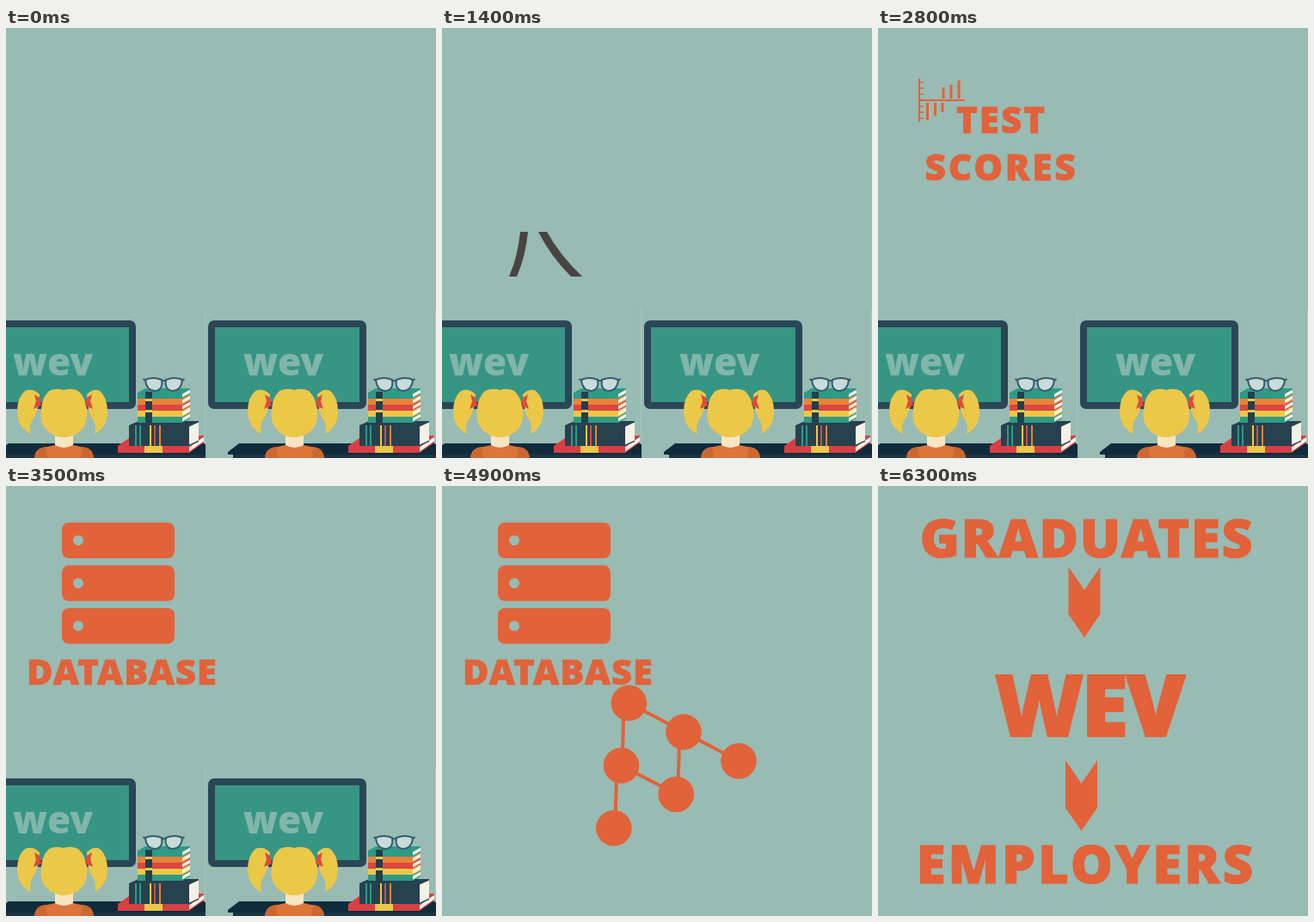
These frames come from a looping animation (500 px wide and 500 px high, 7 s). An HTML page:

```html
<!DOCTYPE html>
<html lang="en">
<head>
<meta charset="utf-8">
<title>Classroom to employers</title>
<style>
html, body { margin: 0; width: 100%; height: 100%; overflow: hidden; background: #98bbb3; }
svg { display: block; width: 100vw; height: 100vh; }
text { font-family: "Open Sans", sans-serif; font-weight: 800; text-anchor: middle; }
.ink { fill: #e2623a; }
.word { fill: #e2623a; stroke: #e2623a; stroke-width: .018em; }
.line { fill: none; stroke: #e2623a; }
.trail { fill: #4a4343; }

/* --at: first beat; the class gives how many 700 ms beats it stays */
.scene { visibility: hidden; animation: 7s step-end infinite; animation-delay: calc(var(--at) * 700ms - 7000ms); }
.b1 { animation-name: show1; }
.b2 { animation-name: show2; }
.b4 { animation-name: show4; }
.b6 { animation-name: show6; }
@keyframes show1 { 0% { visibility: visible } 10%, 100% { visibility: hidden } }
@keyframes show2 { 0% { visibility: visible } 20%, 100% { visibility: hidden } }
@keyframes show4 { 0% { visibility: visible } 40%, 100% { visibility: hidden } }
@keyframes show6 { 0% { visibility: visible } 60%, 100% { visibility: hidden } }
</style>
</head>
<body>
<svg viewBox="0 0 500 500">
  <defs>
    <clipPath id="tile"><rect x="-36" y="320" width="268" height="180"/></clipPath>

    <g id="desk" clip-path="url(#tile)">
      <rect x="-33" y="340" width="184" height="103" rx="7" fill="#2b4656"/>
      <rect x="-25" y="348" width="168" height="87" fill="#379584"/>
      <text x="54.500" y="404" font-size="44" fill="#82b6aa">wev</text>
      <path d="M3 483H232V496H-10V493Z" fill="#0f2b3c"/>
      <path d="M-4 496H232V500H-4Z" fill="#1c3444"/>

      <g id="girl">
        <path d="M33 500Q34 488 48 487L57 485H78L87 487Q100 488 102 500Z" fill="#dd7438"/>
        <path d="M33 500Q34 488 46 487L48 500ZM102 500Q101 488 89 487L87 500Z" fill="#cd6730"/>
        <path d="M43 462H92L78 474V485Q67 491 57 485V474Z" fill="#f8e6c2"/>
        <g fill="#ecc849">
          <path d="M39 426Q31 418 22 422Q13 429 13 447Q14 465 29 472Q26 461 33 452Q38 444 39 426Z"/>
          <path d="M94 426Q102 418 109 422Q118 429 118 447Q117 465 103 472Q106 461 99 452Q95 444 94 426Z"/>
          <path d="M67 421Q76 418 84 422Q92 429 94 443Q96 460 85 470Q67 482 50 470Q38 460 41 443Q42 429 50 422Q59 418 67 421Z"/>
        </g>
        <g fill="#df4a3c">
          <path d="M33 426L39 430L41 439L32 443L35 434Z"/>
          <path d="M100 426L94 430L92 439L101 443L98 434Z"/>
        </g>
      </g>

      <g id="books"></g>
      <path d="M162 423H170V459H162Z" fill="#243f4c"/>
      <path d="M162 431H170V434H162ZM162 444H170V447H162Z" fill="#ecc849"/>
      <path d="M151 462V486M156 462V486" stroke="#2f9a86" stroke-width="2"/>
      <path d="M168 462V486" stroke="#ecc849" stroke-width="2"/>
      <path d="M173 462V486" stroke="#dd4740" stroke-width="2"/>
      <path d="M179 462V486" stroke="#e98237" stroke-width="2"/>
      <path d="M161 486H182V494H161Z" fill="#ecc849"/>

      <g fill="#c8dcda" stroke="#355c70" stroke-width="2">
        <path d="M162 409Q171 405 181 409Q183 421 173 422Q163 421 162 409Z"/>
        <path d="M186 409Q196 405 205 409Q204 421 194 422Q184 421 186 409Z"/>
        <path d="M181 411Q183.500 409 186 411M162 410L159.500 408M205 410L207.500 408" fill="none"/>
      </g>
      <path d="M231.500 327V484" stroke="#a9c7c0"/>
    </g>

    <circle id="node" r="20.800" class="ink"/>
    <path id="arrow" class="ink" d="M0 0L18.500 27L37 0V55L18.500 82L0 55Z"/>
    <g id="server">
      <rect width="131" height="41.500" rx="8" class="ink"/>
      <circle cx="19" cy="20.700" r="6" fill="#98bbb3"/>
    </g>
  </defs>

  <rect width="500" height="500" fill="#98bbb3"/>

  <g class="scene b6" style="--at:0">
    <use href="#desk"/>
    <use href="#desk" x="268"/>
  </g>

  <g class="trail">
    <path class="scene b1" style="--at:1" d="M78 289H87Q78 311 65 333H56Q69 311 78 289ZM150 289H163Q186 311 212 333H198Q172 311 150 289Z"/>
    <path class="scene b1" style="--at:2" d="M91 237H100Q97 266 87 289H78Q88 266 91 237ZM112 237H122Q137 264 163 289H150Q126 265 112 237Z"/>
    <path class="scene b1" style="--at:3" d="M97 190H106Q103 212 100 237H91Q94 212 97 190ZM97 190H106Q110 214 122 237H112Q101 214 97 190Z"/>
  </g>

  <g class="scene b1" style="--at:4">
    <path class="line" stroke-width="2" d="M48 59V109M48 84H101"/>
    <path class="line" stroke-width="1.500" d="M48 63H53M48 70H53M48 77H53M48 91H53M48 98H53M48 105H53"/>
    <path class="line" stroke-width="3" d="M76 69V82M85 66V82M94 61V82M57.500 87V107M66.500 87V102M75 87V98"/>
    <text class="word" x="143.500" y="122" font-size="42" letter-spacing="2">TEST</text>
    <text class="word" x="143.500" y="177" font-size="42.500" letter-spacing="2.700">SCORES</text>
  </g>

  <g class="scene b4" style="--at:5">
    <use href="#server" x="65" y="42.500"/>
    <use href="#server" x="65" y="92.300"/>
    <use href="#server" x="65" y="142"/>
    <text class="word" x="135" y="231" font-size="41.500" letter-spacing="1.200">DATABASE</text>
  </g>

  <g class="scene b1" style="--at:6">
    <path class="line" stroke-width="4" d="M211.500 252L209.500 325M217 252L281 286.500"/>
    <use href="#node" x="217.300" y="252.300"/>
    <use href="#node" x="280.700" y="286.500"/>
    <use href="#node" x="208.500" y="325"/>
  </g>

  <g class="scene b2" style="--at:7">
    <path class="line" stroke-width="4" d="M211.500 252L209.500 325M217 252L281 286L345 320M276.500 286L274 358M208.500 325L272 358M203.500 325L201 398"/>
    <use href="#node" x="217.300" y="252.300"/>
    <use href="#node" x="281" y="286"/>
    <use href="#node" x="208.500" y="325"/>
    <use href="#node" x="345" y="319.800"/>
    <use href="#node" x="272.200" y="358.500"/>
    <use href="#node" x="199.800" y="397.800"/>
  </g>

  <text class="word scene b1" style="--at:8" x="360" y="446" font-size="41" letter-spacing="2.100">EMPLOYERS</text>

  <g class="scene b1" style="--at:9">
    <text class="word" x="243" y="82.500" font-size="62.500" letter-spacing="1.500">GRADUATES</text>
    <text class="word" x="245" y="291" font-size="100" letter-spacing="-3">WEV</text>
    <text class="word" x="242" y="462" font-size="61.500" letter-spacing="3.100">EMPLOYERS</text>
    <use href="#arrow" x="221.500" y="94"/>
    <use href="#arrow" x="218" y="319"/>
  </g>
</svg>
<script>
const shelf = document.getElementById("books");

function addShape(points, fill) {
  const shape = document.createElementNS("http://www.w3.org/2000/svg", "polygon");
  shape.setAttribute("points", points.join(" "));
  shape.setAttribute("fill", fill);
  shelf.append(shape);
}

// A lying book: the front runs from left to right, its pages recede by (dx, -dy).
function addBook(left, right, top, bottom, dx, dy, cover) {
  const far = right + dx, edge = 1.5;
  addShape([left, top, left + dx, top - dy, far, top - dy, far, bottom - dy, right, bottom, left, bottom], cover);
  addShape([right, top + edge, far, top - dy + edge, far, bottom - dy - edge, right, bottom - edge], "#f4f1e6");
}

addBook(130, 213, 486, 494, 17, 12, "#d73f43");
addBook(143, 213, 462, 486, 11, 5, "#27414f");
["#2f9a86", "#ecc849", "#dd4740", "#e98237", "#2f9a86"].forEach((cover, i) => {
  const bottom = 459 - i * 7;
  addBook(153, 205, bottom - 7, bottom, 9, 5, cover);
});
</script>
</body>
</html>
```
